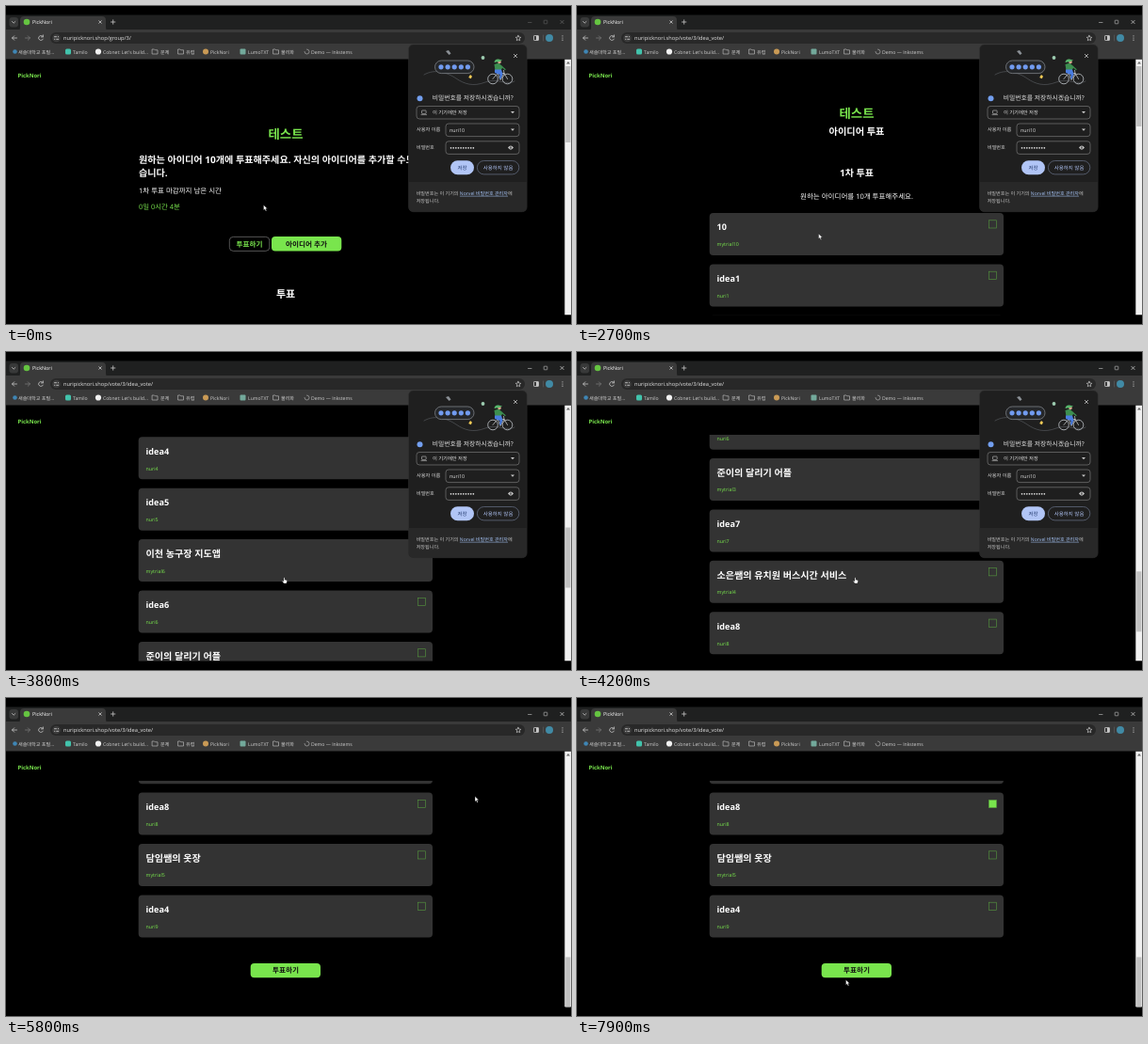
These frames come from a looping animation (600 px wide and 338 px high, 8000 ms). An HTML page:

```html
<!DOCTYPE html>
<html lang="ko">
<head>
<meta charset="utf-8">
<title>Idea vote</title>
<style>
html, body { margin: 0; width: 100%; height: 100%; overflow: hidden; background: #000; }
svg { display: block; }
#stage { width: 100vw; height: 100vh; }
text { font-family: "Open Sans", "Noto Sans CJK KR", "Noto Sans CJK", sans-serif; white-space: pre; text-rendering: geometricPrecision; }
</style>
</head>
<body>
<svg id="stage" viewBox="0 0 600 338"></svg>
<script>
const GREEN = '#79e54d', BLUE = '#b1c5f6', GREY = '#c7c7c7';
const PITCH = 54.4, FIRST = 220;

// Text is placed by its vertical centre.
const text = (x, y, size, str, fill = '#fff', more = '') =>
  `<text x="${x}" y="${y}" dy=".36em" font-size="${size}" fill="${fill}" ${more}>${str}</text>`;
const bold = (x, y, size, str, fill, more = '') => text(x, y, size, str, fill, 'font-weight="700" ' + more);
const mid = (y, size, str, fill) => bold(297, y, size, str, fill, 'text-anchor="middle"');
const rect = (x, y, w, h, r, fill, more = '') =>
  `<rect x="${x}" y="${y}" width="${w}" height="${h}" rx="${r}" fill="${fill}" ${more}/>`;
const frame = (x, y, w, h, r, stroke, width = .7) =>
  rect(x, y, w, h, r, 'none', `stroke="${stroke}" stroke-width="${width}"`);
const dot = (x, y, r, fill, more = '') => `<circle cx="${x}" cy="${y}" r="${r}" fill="${fill}" ${more}/>`;
const line = (d, stroke = GREY, width = .8) =>
  `<path d="${d}" fill="none" stroke="${stroke}" stroke-width="${width}" stroke-linecap="round" stroke-linejoin="round"/>`;
const shape = (d, fill, more = '') => `<path d="${d}" fill="${fill}" ${more}/>`;
const caret = (x, y) => shape(`M${x - 2} ${y - 1}h4l-2 2.2z`, GREY);
const cross = (x, y, r) => line(`M${x - r} ${y - r}l${2 * r} ${2 * r}m0 ${-2 * r}l${-2 * r} ${2 * r}`);
const folder = x => line(`M${x} 46h2l.8 .8h2.700v4.200h-5.500z`, GREY, .6);

function browser() {
  const marks = [[13, '새솔대학교 포털...'], [71, 'Tamilo'], [103, "Cobnet: Let's build..."], [164, '문제'],
    [191, '유럽'], [217, 'PickNori'], [257, 'LumoTXT'], [292, '물리화'], [324, 'Demo — Inkstems']];
  return rect(0, 9.5, 600, 16.5, 0, '#1f2020') + rect(0, 25, 600, 31.5, 0, '#3a3a3a') +
    shape('M13 25.5q2 0 2-2.500v-8q0-4 4-4h83q4 0 4 4v8q0 2.500 2 2.500z', '#3a3a3a') +
    rect(3.5, 12, 9.5, 10.5, 3, '#383939') + line('M6.500 16.500l1.700 1.700l1.700-1.700') +
    dot(22, 17, 3.3, '#65c441') + text(28, 17.2, 5.4, 'PickNori') +
    cross(100, 17, 1.3) + line('M111.500 17h4.400m-2.200-2.200v4.400') +
    `<g id="controls">${line('M554.500 17.500h3.500', GREY, .6) + frame(571.2, 15.2, 3.6, 3.6, .5, GREY, .6) + cross(590.5, 17, 1.6)}</g>` +
    line('M11.500 34h-5m2.200-2.200l-2.200 2.200l2.200 2.200') +
    line('M20.500 34h5m-2.200-2.200l2.200 2.200l-2.200 2.200', '#777') +
    line('M39.200 32.500a2.500 2.500 0 1 0 .2 2.600m0-4.200v2h-2') +
    rect(47, 28, 504, 12, 6, '#282828') + dot(53.5, 34, 4.3, '#3d3d3d') +
    line('M51.500 32.700h2m1.800 0h.3m-4.100 2.600h.4m1.800 0h2', GREY, .9) +
    '<text id="url" x="61" y="34" dy=".36em" font-size="5.7" fill="#e3e3e3"></text>' +
    line('M544 31.300l.8 1.800l2 .2l-1.500 1.400l.4 2l-1.700-1l-1.700 1l.4-2l-1.500-1.400l2-.2z', GREY, .7) +
    frame(560.5, 31.5, 5, 5, .6, GREY, .8) + rect(563, 31.5, 2.5, 5, .4, GREY) +
    line('M570.500 31v6', '#666', .5) + dot(577, 34, 4, '#418aa5') +
    [31.8, 34, 36.2].map(y => dot(591, y, .6, GREY)).join('') +
    dot(9.5, 48.5, 2.3, '#3f86b5') + rect(63, 45.5, 6, 6, 1.5, '#42c3ac') + dot(98, 48.5, 3.1, '#f2f2f2') +
    folder(155.500) + folder(183) + dot(212, 48.5, 3, '#c99a55') +
    rect(248.5, 45.5, 6, 6, 1, '#73a99b') + folder(284) +
    line('M319.500 46a2.500 2.500 0 1 1-2.500 2.500', '#aaa', .7) +
    marks.map(([x, s]) => text(x, 48.7, 5.1, s, '#d0d0d0')).join('') +
    bold(12.5, 74.3, 5.9, 'PickNori', GREEN);
}

function groupPage() {
  return mid(136.5, 13.4, '테스트', GREEN) +
    bold(141, 163, 10.1, '원하는 아이디어 10개에 투표해주세요. 자신의 아이디어를 추가할 수도 있') +
    bold(141, 177, 10.1, '습니다.') +
    text(141, 196, 7.5, '1차 투표 마감까지 남은 시간') + text(141, 213.5, 7.4, '0일 0시간 4분', GREEN) +
    frame(237.3, 245.4, 42.5, 15, 4, '#777') + bold(244.5, 252.8, 7.6, '투표하기', GREEN) +
    rect(282, 245, 74.3, 15.6, 4, GREEN) + bold(297, 252.8, 7.6, '아이디어 추가', '#111') +
    mid(306, 11, '투표');
}

const cards = [['10', 'mytrial10'], ['idea1', 'nuri1'], ['민호의공장', 'mytrial1'], ['idea2', 'nuri2'],
  ['나래의토마토수확기', 'mytrial7'], ['동구의개미일기장', 'mytrial8'], ['idea3', 'nuri3'], ['idea4', 'nuri4'],
  ['idea5', 'nuri5'], ['이천 농구장 지도앱', 'mytrial6'], ['idea6', 'nuri6'], ['준이의 달리기 어플', 'mytrial3'],
  ['idea7', 'nuri7'], ['소은쌤의 유치원 버스시간 서비스', 'mytrial4'], ['idea8', 'nuri8'],
  ['담임쌤의 옷장', 'mytrial5'], ['idea4', 'nuri9']];

function votePage() {
  return mid(114.5, 13.4, '테스트', GREEN) + mid(133, 10.2, '아이디어 투표') + mid(177, 10, '1차 투표') +
    text(297, 202, 7.5, '원하는 아이디어를 10개 투표해주세요.', '#fff', 'text-anchor="middle"') +
    cards.map(([title, user], i) => {
      const y = FIRST + i * PITCH;
      return rect(140.7, y, 312.3, 45, 4, '#333') +
        bold(148.5, y + 15.2, /^\w/.test(title) ? 9.1 : 10.1, title) + text(148.5, y + 33.5, 5.3, user, GREEN) +
        rect(437.3, y + 7.8, 8.2, 8.2, 0, 'none', `id="box${i}" stroke="#569a3e" stroke-width=".6"`);
    }).join('') +
    rect(259.7, 1163, 74.3, 15.3, 4, GREEN) + mid(1170.6, 7.6, '투표하기', '#111');
}

function popup() {
  const wheel = x => dot(x, 77.5, 5.3, 'none', 'stroke="#c5c9ce" stroke-width=".8"');
  const dots = (n, x, step, y, r, fill) => Array.from({length: n}, (_, i) => dot(x + i * step, y, r, fill)).join('');
  return rect(427.5, 41, 125.7, 177.7, 5, '#1f1f1f', 'stroke="#333" stroke-width=".5"') +
    shape('M427.700 187h125.300v26.500q0 5-5 5h-115.300q-5 0-5-5z', '#282828') +
    line('M444 73c12-7 25-2 34 4s18 9 31 4s23 4 31-1', '#696d72', .5) +
    shape('M467 48l3-1l2.500 3.500l-2 1.500z', '#8b9096') +
    rect(455.5, 58, 41.5, 13.6, 6.8, '#25272a', 'stroke="#8b9096" stroke-width=".7"') +
    dots(5, 462, 7.1, 64.8, 2.6, '#719bf0') +
    dot(506.5, 55, 1.9, '#9ccbb0') + shape('M493 73l2 1.800l-1.300 2.400l-2.500-1.300z', '#f5cd57') +
    wheel(517) + wheel(532.500) + line('M517 77.500l5-6h7l3.500 6m-3.500-6l-4 7l-3-7m7 0l-.5-3', '#d5d8dc', .7) +
    shape('M518.500 62l5-1.500l4 4.500l-2 3.500l-6 .5z', '#3d8f50') +
    shape('M519 67.500l7 0l1.500 5l-2 5h-1.500l.5-4.500l-5.500-2z', '#4a7de0') +
    line('M525.500 63.500l4.500 4', '#3d8f50', 1.2) + dot(524, 59.5, 1.8, '#d6a58b') +
    shape('M518.500 60q.5-4 4.500-3.500l4 1l-3 1.500z', '#58b86c') +
    cross(541, 53, 1.7) + dot(439.5, 98.3, 3, '#739ff0') +
    text(452.8, 98, 6.8, '비밀번호를 저장하시겠습니까?', '#e3e3e3') +
    frame(436, 106.5, 109, 13.5, 3, '#777') + frame(441.5, 111, 4.6, 3.4, .5, GREY, .6) + line('M441 115.600h5.600', GREY, .6) +
    text(453, 113.2, 5.3, '이 기기에만 저장', '#e3e3e3') + caret(538, 113) +
    text(436, 131.6, 5.2, '사용자 이름', '#ddd') + frame(467, 125, 78, 13.6, 3, '#777') +
    text(471, 131.8, 5.3, 'nuri10', '#e3e3e3') + caret(538, 131.600) +
    text(436, 150.5, 5.1, '비밀번호', '#ddd') + frame(467, 143.8, 78, 13.6, 3, '#777') +
    dots(10, 472.5, 2.65, 150.8, .85, '#e3e3e3') +
    shape('M533 150.600q3-4.200 6 0q-3 4.200-6 0z', GREY) + dot(536, 150.6, 1.1, '#1f1f1f') + dot(536, 150.6, .6, GREY) +
    rect(472, 164.2, 25, 15, 7.5, BLUE) + text(484.5, 171.7, 5.5, '저장', '#263d70', 'text-anchor="middle"') +
    frame(500.4, 164.5, 44.4, 14.4, 7.2, '#69738a') +
    text(522.6, 171.7, 5.5, '사용하지 않음', BLUE, 'text-anchor="middle"') +
    text(435.7, 199, 5.1, '비밀번호는 이 기기의 <tspan fill="#a8c7fa" text-decoration="underline">Norvel 비밀번호 관리자</tspan>에', GREY) +
    text(435.7, 207, 5.1, '저장됩니다.', GREY);
}

const stage = document.getElementById('stage');
stage.innerHTML = rect(0, 0, 600, 338, 0, '#000') + browser() +
  '<svg y="88" width="593" height="240.500" viewBox="0 88 593 240.500">' +
  `<g id="group">${groupPage()}</g><g id="vote">${votePage()}</g></svg>` +
  '<svg y="56.500" width="600" height="272" viewBox="0 56.500 600 272">' +
  rect(593.3, 56.5, 7, 272, 0, '#f1f1f1') + shape('M595 61.500h4l-2-2.400z', '#666') +
  rect(594.2, 64, 5.2, 64, 0, '#c1c1c1', 'id="thumb"') + '</svg>' +
  `<g id="popup">${popup()}</g><g id="cursor">` +
  shape('M0 0v5.600l1.300-1.200l1 2.200l1-.45l-1-2.150h1.800z', '#fff', 'id="arrow" stroke="#000" stroke-width=".35"') +
  shape('M-.6 .4q.6-.9 1.200 0v2l2 .6q.6 .3 .4 1.200l-.6 2.300h-2.900l-1.800-2.600q.2-.9 1.700 .2z', '#fff', 'id="hand" stroke="#000" stroke-width=".35"') +
  '</g>';

const $ = id => document.getElementById(id);
const show = (id, on) => $(id).setAttribute('display', on ? 'inline' : 'none');

// Keys are [time, values...]; values are interpolated linearly.
function at(keys, t) {
  const i = keys.findIndex(k => k[0] > t);
  if (i < 1) return keys[i < 0 ? keys.length - 1 : 0].slice(1);
  const a = keys[i - 1], b = keys[i], p = (t - a[0]) / (b[0] - a[0]);
  return a.slice(1).map((v, n) => v + (b[n + 1] - v) * p);
}

const scrollKeys = [[2800, 0], [3300, 250.2], [3800, 510], [4500, 851], [4650, 881],
  [6400, 881], [6700, 763.5], [7300, 763.5], [7600, 881]];
const cursorKeys = [[0, 273.5, 211.5], [400, 273.5, 211.5], [1200, 259, 251], [2200, 259, 251], [2600, 256.5, 242],
  [2800, 256.5, 242], [3200, 295.5, 239.5], [4700, 295.5, 239.5], [5200, 541, 53], [5500, 541, 53],
  [6200, 441, 173], [6800, 441, 173], [7000, 442.5, 224], [7300, 442.5, 224], [7800, 285.5, 299.5]];
const handSpans = [[1100, 2200], [2900, 4800], [6100, 7500]];

function draw(now) {
  const t = now % 8000, voting = t >= 2200;
  const [scroll] = at(scrollKeys, t), [x, y] = at(cursorKeys, t);
  const hand = handSpans.some(([a, b]) => t >= a && t < b);
  $('url').textContent = 'nuripicknori.shop/' + (voting ? 'vote/3/idea_vote/' : 'group/3/');
  $('controls').setAttribute('opacity', voting ? 1 : .4);
  show('group', !voting);
  show('vote', voting);
  $('vote').setAttribute('transform', `translate(0 ${-scroll})`);
  $('thumb').setAttribute('y', 64 + scroll * .24);
  $('thumb').setAttribute('height', voting ? 64 : 81);
  show('popup', t < 5500);
  $('box13').setAttribute('fill', t >= 6750 ? GREEN : 'none');
  $('box14').setAttribute('fill', t >= 7150 ? GREEN : 'none');
  $('cursor').setAttribute('transform', `translate(${x} ${y})`);
  show('arrow', !hand);
  show('hand', hand);
}

const start = performance.now();
function tick() {
  draw(performance.now() - start);
  requestAnimationFrame(tick);
}
tick();
</script>
</body>
</html>
```
